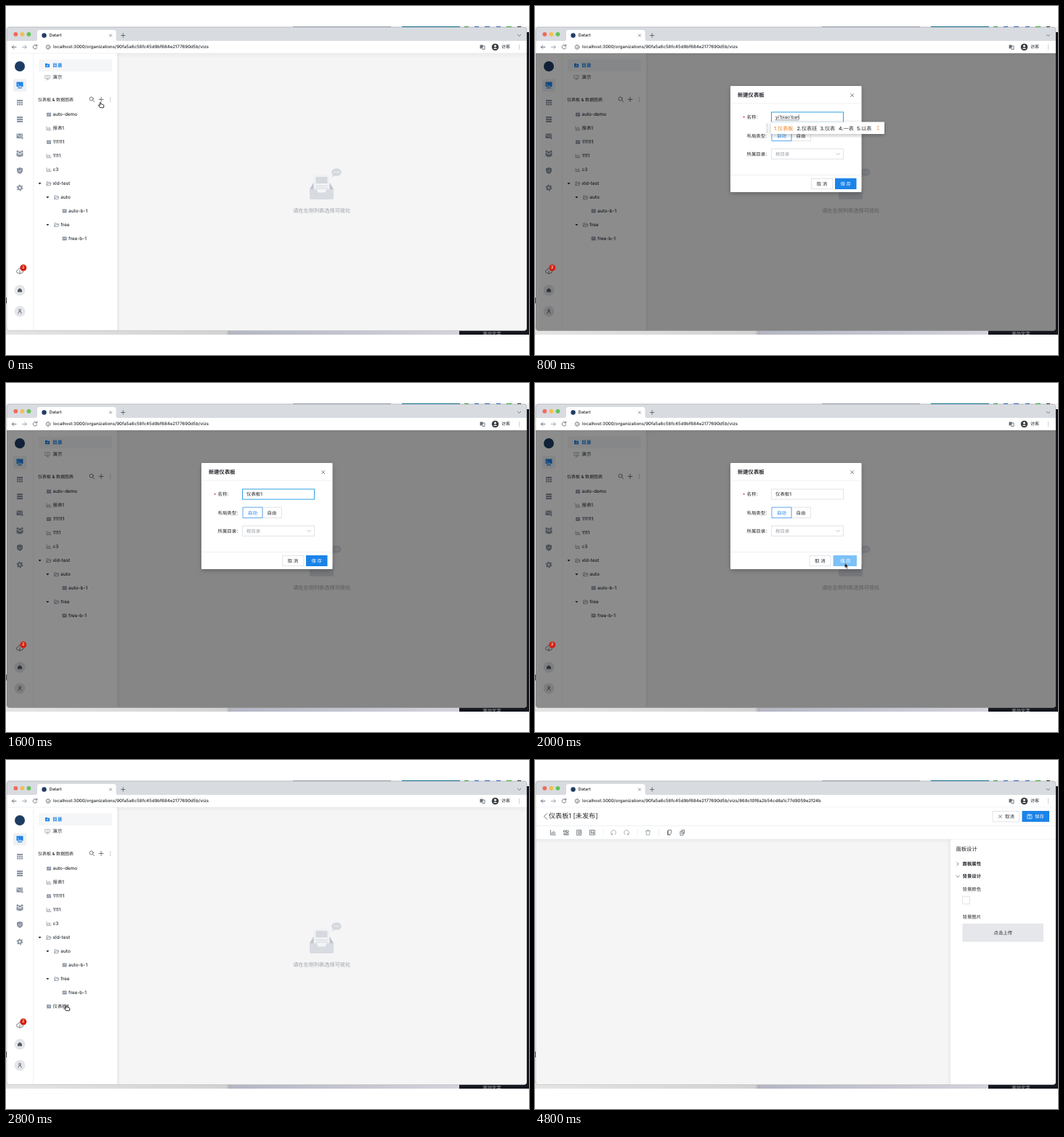
Write an HTML page that moves like this. It is 720x480 px and loops after 5.2 s.

```html
<!DOCTYPE html>
<html lang="zh">
<head>
<meta charset="utf-8">
<title>新建仪表板</title>
<style>
html, body { margin: 0; width: 100%; height: 100%; overflow: hidden; background: #fff; }
svg { display: block; }
#stage { width: 100vw; height: 100vh; }
text {
  font: 500 6.4px Inter, "Noto Sans CJK SC", "Noto Sans CJK", sans-serif;
  fill: #25282d; dominant-baseline: central; text-rendering: geometricPrecision;
}
.mid { text-anchor: middle; }
.bold { font-weight: 600; }
.plain { font-weight: 400; }
.url { font-size: 6.05px; }
.head { font-size: 9.1px; font-weight: 400; }
.title { font-size: 7.3px; }
.blue { fill: #1b83e8; }
.soft { fill: #9a9fa7; font-weight: 400; }
.white { fill: #fff; }
.line { fill: none; stroke: #555b64; stroke-width: .8; stroke-linecap: round; stroke-linejoin: round; }
.dim { stroke: #8b95a4; }
.rule { stroke: #e9ebee; stroke-width: .7; }
.btn { fill: #fff; stroke: #d5d8dd; stroke-width: .7; }
.on { stroke: #1b83e8; }
.grey { fill: #8b95a4; }

/* 13 beats of 400 ms, every change is a hard cut */
.t { animation: 5.2s step-end infinite; }
.workspace { animation-name: workspace; }
.empty { animation-name: empty; }
.opened { animation-name: opened; }
.created { animation-name: created; }
.dash { animation-name: dash; }
.editor { animation-name: editor; }
.modal { animation-name: modal; }
.pinyin { animation-name: pinyin; }
.word { animation-name: word; }
.numbered { animation-name: numbered; }
.focus { animation-name: focus; }
.ready { animation-name: ready; }
.saving { animation-name: saving; }
.hand { animation-name: hand; }
.arrow { animation-name: arrow; }
@keyframes workspace { 0% { opacity: 1 } 76.923% { opacity: 0 } }
@keyframes empty { 0% { opacity: 1 } 61.5384% { opacity: 0 } }
@keyframes opened { 0% { opacity: 0 } 61.5384%, 100% { opacity: 1 } }
@keyframes created { 0% { opacity: 0 } 46.1538%, 100% { opacity: 1 } }
@keyframes dash { 0%, 76.923% { opacity: 0 } 61.5384% { opacity: 1 } }
@keyframes editor { 0% { opacity: 0 } 76.923%, 100% { opacity: 1 } }
@keyframes modal { 0%, 46.1538% { opacity: 0 } 15.3846% { opacity: 1 } }
@keyframes pinyin { 0%, 23.0769% { opacity: 0 } 15.3846% { opacity: 1 } }
@keyframes word { 0%, 30.7692% { opacity: 0 } 23.0769% { opacity: 1 } }
@keyframes numbered { 0% { opacity: 0 } 30.7692%, 100% { opacity: 1 } }
@keyframes focus { 0%, 38.4615% { opacity: 0 } 15.3846% { opacity: 1 } }
@keyframes ready { 0% { opacity: 1 } 38.4615% { opacity: 0 } }
@keyframes saving { 0% { opacity: 0 } 38.4615%, 100% { opacity: 1 } }
@keyframes hand {
  0% { opacity: 1; transform: translate(131px, 136px) }
  15.3846% { opacity: 0; transform: none }
  53.8461% { opacity: 1; transform: translate(84px, 341px) }
  61.5384% { opacity: 0; transform: none }
  69.2307% { opacity: 1; transform: translate(669px, 109px) }
  76.923% { opacity: 0 }
}
@keyframes arrow {
  0%, 53.8461%, 69.2307% { opacity: 0; transform: none }
  38.4615% { opacity: 1; transform: translate(426.5px, 247.5px) }
  46.1538% { opacity: 1; transform: translate(369px, 264px) }
  61.5384% { opacity: 1; transform: translate(420px, 210px) }
}
</style>
</head>
<body>
<svg id="stage" viewBox="0 0 720 480" preserveAspectRatio="none">
<defs>
  <linearGradient id="desk"><stop stop-color="#e4e4e4"/><stop offset=".98" stop-color="#d2d2d4"/><stop offset="1" stop-color="#a9a9b0"/></linearGradient>
  <linearGradient id="desk2"><stop stop-color="#b4b6c4"/><stop offset="1" stop-color="#d3d3dc"/></linearGradient>
  <linearGradient id="fade" x2="0" y2="1"><stop stop-opacity=".04"/><stop offset="1" stop-opacity="0"/></linearGradient>
  <linearGradient id="edge"><stop stop-opacity=".045"/><stop offset="1" stop-opacity="0"/></linearGradient>
  <filter id="shadow" x="-20%" y="-20%" width="140%" height="150%"><feDropShadow dx="0" dy="2" stdDeviation="3" flood-opacity=".25"/></filter>
  <clipPath id="window"><path d="M1 33q0-4 4-4H713q4 0 4 4V442q0 4.500-4 4.500H5q-4 0-4-4.500z"/></clipPath>
  <clipPath id="desktop"><path d="M0 28H720V452H0z"/></clipPath>
  <symbol id="board" overflow="visible"><path d="M-3-2.500h6v5h-6z" fill="#8b95a4"/><path d="M-2 .8l1.300-1.500L.4.300 2-1.200" fill="none" stroke="#fff" stroke-width=".7"/></symbol>
  <symbol id="chart" overflow="visible"><path class="line dim" d="M-3-2.500v5H3M-1.200 1v-1.500M.4 1v-2.400M2 1V-.3" stroke-width=".6"/></symbol>
  <symbol id="folder" overflow="visible"><path class="line dim" d="M-3 2.200V-2.200H-.8l.7.900H2.300V0M-3 2.200L-1.900 0H3.200L2.200 2.200z" stroke-width=".7"/></symbol>
  <symbol id="close" overflow="visible"><path class="line" d="M-2-2L2 2M2-2L-2 2"/></symbol>
  <symbol id="dots" overflow="visible"><path d="M0-2.500h.01M0 0h.01M0 2.500h.01" stroke="#777e88" stroke-width="1.200" stroke-linecap="round"/></symbol>
</defs>

<g clip-path="url(#desktop)">
  <path d="M0 28H720V452H0z" fill="#f3f3f4"/>
  <path d="M395 28.500H530" stroke="#a5afb9"/>
  <path d="M545 28.500H625" stroke="#16789a"/>
  <g stroke-width="2"><path d="M631 28.500h6" stroke="#3aa655"/><path d="M645 28.500h6M659 28.500h7M675 28.500h6" stroke="#3569c9"/><path d="M689 28.500h7" stroke="#2eb82e"/><path d="M704 28.500h5" stroke="#333"/></g>
  <path d="M0 440H309V452H0z" fill="url(#desk)"/>
  <path d="M309 440H624V452H309z" fill="url(#desk2)"/>
  <path d="M624 440H720V452H624zM716 36H720V452H716z" fill="#15171e"/>
  <path d="M0 401H2V409H0z" fill="#555"/>
  <text class="plain" x="656" y="451" style="fill:#b9bbc0">滚动文字</text>
</g>

<g clip-path="url(#window)">
  <path d="M0 28H718V448H0z" fill="#fff"/>
  <path d="M0 28H718V48H0z" fill="#d8dbe0"/>
  <path d="M40 48q3 0 3-3V36q0-3 3-3H148.500q3 0 3 3V45q0 3 3 3z" fill="#fff"/>
  <circle cx="13.300" cy="38.800" r="2.900" fill="#ed6a5e"/><circle cx="22.400" cy="38.800" r="2.900" fill="#f4be4f"/><circle cx="31.400" cy="38.800" r="2.900" fill="#61c454"/>
  <circle cx="52.500" cy="40.500" r="3.200" fill="#1f3d63"/>
  <text x="59.500" y="40.500" style="font-size:5.800px">Datart</text>
  <use href="#close" transform="translate(144 40.500) scale(.8)"/>
  <path class="line" d="M158.500 40.500h5.400M161.200 37.800v5.400M704.500 39.500l2 2 2-2"/>
  <path class="line" d="M14 56.500H8.300M10.800 54L8.300 56.500 10.800 59"/>
  <path class="line dim" d="M22.500 56.500h5.700M25.700 54l2.500 2.500-2.500 2.500"/>
  <path class="line" d="M42.300 54.700a2.800 2.800 0 1 0 .4 2.500M42.700 53v2h-2"/>
  <circle class="line" cx="58" cy="56.500" r="2.800"/><path class="line" d="M58 56.300v1.600M58 54.900v.1"/>
  <text class="url" x="65" y="56.500">localhost:3000/organizations/90fa5a6c58fc45d9bf684e2177690d5b/vizs<tspan class="t opened" id="suffix"></tspan></text>
  <g class="t opened"><path d="M64 52H410V61H64z" fill="#fff"/><text class="url" x="65" y="56.500">localhost:3000/organizations/90fa5a6c58fc45d9bf684e2177690d5b/vizs/868c10f6a2b54cd8a1c77d9059e2f24b</text></g>
  <path d="M652.500 53.500h4v5h-4z" fill="#777e88"/><path class="line" d="M656 55h3v4.500h-3M653.500 55h2M654.500 55l-1 2"/>
  <circle cx="673.500" cy="56.500" r="4.800" fill="#3c4043"/><circle cx="673.500" cy="55" r="1.500" fill="#fff"/><path d="M670.700 59q2.800-3 5.600 0z" fill="#fff"/>
  <text x="682" y="56.500" style="font-size:6px">访客</text>
  <use href="#dots" x="706.500" y="56.500"/>
  <path class="rule" d="M0 65H718"/>

  <g class="t workspace">
    <circle cx="19" cy="83" r="7" fill="#1f3d63"/>
    <rect x="10" y="100.500" width="18" height="17" rx="1.500" fill="#eef0f4"/>
    <path d="M14.500 104.500h9v6.500h-9zM16 112h6v1.200h-6z" fill="#1b83e8"/><path d="M16 107l1.500 1.500L16 110M18.500 110h2.500" fill="none" stroke="#fff" stroke-width=".7"/>
    <g class="grey">
      <path d="M15 129h8v2h-8zM15 131.800h2.300v2h-2.300zM17.900 131.800h2.300v2h-2.300zM20.800 131.800h2.200v2h-2.200zM15 134.500h2.300v2h-2.300zM17.900 134.500h2.300v2h-2.300zM20.800 134.500h2.200v2h-2.200z"/>
      <path d="M15 152h8v2.200h-8zM15 154.900h8v2.200h-8zM15 157.800h8v2.200h-8z"/>
      <path d="M14.500 175.500h8.500v6.500h-8.500z"/><path d="M15 176.500l3.800 3 3.700-3" fill="none" stroke="#fff" stroke-width=".8"/><circle cx="22.200" cy="181.500" r="1.700" stroke="#fff" stroke-width=".6"/>
      <circle cx="16" cy="200" r="1.600"/><circle cx="22" cy="200" r="1.600"/><circle cx="19" cy="201.500" r="1.700"/><path d="M14.500 202h2.200v4.500h-2.200zM21.300 202h2.200v4.500h-2.200zM16.500 204h5v3.500h-5z"/>
      <path d="M19 222l4 1.300V227q-.5 2.800-4 4-3.500-1.200-4-4v-3.700z"/><path d="M17.300 226.300l1.300 1.400 2.300-2.500" fill="none" stroke="#fff" stroke-width=".8"/>
      <circle cx="19" cy="250" r="3.200"/><circle cx="19" cy="250" r="3.700" fill="none" stroke="#8b95a4" stroke-width="1.400" stroke-dasharray="1.900 1.980"/><circle cx="19" cy="250" r="1.400" fill="#fff"/>
    </g>
    <path class="line" d="M17 367.500q-2.500 0-2.500-2.300 0-1.900 2-2.300.8-2.400 3.300-1.900 1.700.4 2 2 1.700.4 1.700 2.200 0 2.300-2.500 2.300M19 364v4.500l-1.300-1.300M19 368.500l1.300-1.300"/>
    <circle cx="19" cy="391" r="7.500" fill="#e4e6ea"/><path d="M16 390.500l3-2.500 3 2.500v3h-6z" fill="#555b64"/>
    <circle cx="19" cy="420" r="7.500" fill="#e4e6ea"/><circle class="line" cx="19" cy="418.500" r="1.400"/><path class="line" d="M16.800 423q0-2.700 2.200-2.700t2.200 2.700"/>

    <path class="rule" d="M37.700 65V447"/>
    <path d="M45 73.500H146V90H45z" fill="#f5f6f8"/>
    <path d="M54 79h2.500l.8.800H60V84.200H54z" fill="#1b83e8"/><path d="M55.500 82h3M57 80.700v2.500" stroke="#fff" stroke-width=".6"/>
    <text class="blue bold" x="64" y="81.500" style="font-size:6.700px">目录</text>
    <path class="line dim" d="M54 95.500h6.500v4H54zM57.200 99.500v1.700M55.500 101.200h3.500M55.800 97.300h3" style="stroke-width:.6"/>
    <text x="64" y="98" style="font-size:6.700px">演示</text>
    <text x="44" y="129" style="font-size:6px">仪表板 &amp; 数据图表</text>
    <circle class="line" cx="117.600" cy="127.700" r="2.500"/><path class="line" d="M119.500 129.600l2.200 2.200M128 128.500h6M131 125.500v6"/>
    <use href="#dots" x="143.700" y="128.500"/>
    <g id="tree"></g>
    <g class="t created"><use href="#board" x="59" y="339"/><text x="64.500" y="339">仪表板1</text></g>
    <g class="t opened"><path d="M38 330H153V349H38z" fill="#f5f6f8"/><path d="M56 336.500h6v5h-6z" fill="#1b83e8"/><path d="M57 340l1.300-1.500 1.100 1 1.600-1.500" fill="none" stroke="#fff" stroke-width=".7"/><text class="blue" x="64.500" y="339">仪表板1</text></g>

    <path d="M153 65H717V447H153z" fill="#f5f5f5"/>
    <g class="t empty">
      <path d="M153 65H717V71H153z" fill="url(#fade)"/>
      <ellipse cx="455" cy="228.500" rx="6.800" ry="5.300" fill="#d5d9df"/><path d="M450 231.500l-1.200 4.200 4-2.500z" fill="#d5d9df"/>
      <path d="M452 228.500h.01M455 228.500h.01M458 228.500h.01" stroke="#fff" stroke-width="1.500" stroke-linecap="round"/>
      <path d="M418 252l5-8.500h23l5 8.500z" fill="#c0c5cd"/>
      <path d="M423.500 232.500h22v20h-22z" fill="#f0f1f4"/>
      <path d="M426.500 235h16v9h-16zM426.500 247h16v1h-16zM426.500 250h16v1h-16z" fill="#d5d9df"/>
      <path d="M418 252h9.500q1 0 1 2 0 2.500 2 2.500h8q2 0 2-2.500 0-2 1-2H451v12q0 2-2 2H420q-2 0-2-2z" fill="#d8dbe1"/>
      <text class="soft mid" x="434.700" y="281" style="font-size:7.200px">请在左侧列表选择可视化</text>
    </g>
    <g class="t dash">
      <path d="M158.500 70H204V87H158.500z" fill="#eceef1"/>
      <text class="blue bold" x="165.500" y="78.500">仪表板1</text>
      <path d="M153 92H717V119H153z" fill="#fff"/><path d="M153 119H717V125H153z" fill="url(#fade)"/>
      <path class="rule" d="M153 92H717"/>
      <text class="head" x="162" y="105.500">仪表板1 [未发布]</text>
      <path class="btn" d="M612 98.500h36.500v14.500H612zM693.500 98.500H708v14.500h-14.500z"/><path class="btn on" d="M652.500 98.500H690v14.500h-37.500z"/>
      <path class="line" d="M619.500 103l5.300 2.700-5.300 2.700 1.200-2.700zM620.700 105.700h2"/><text x="629" y="106">发布</text>
      <path class="line on" d="M661 106.500l3-3.300 1.300 1.200-3 3.200-1.600.4zM660.500 109h5.500"/><text class="blue" x="669.500" y="106">编辑</text>
      <use href="#dots" transform="translate(700.700 105.700) scale(.8)"/>
    </g>
    <path d="M153 65h5V447h-5z" fill="url(#edge)"/>
  </g>

  <g class="t modal">
    <path d="M0 65H718V448H0z" opacity=".45"/>
    <rect x="269" y="110" width="180.500" height="146" rx="1" fill="#fff" filter="url(#shadow)"/>
    <text class="title bold" x="279" y="122.500">新建仪表板</text><use href="#close" x="436.700" y="122.700"/>
    <path class="rule" d="M269 134H449.500M269 232.500H449.500"/>
    <text x="286" y="154" style="fill:#f5222d">*</text>
    <text class="plain" x="291.500" y="153">名称：</text>
    <text class="plain" x="291.500" y="178.500">布局类型：</text>
    <text class="plain" x="291.500" y="203.500">所属目录：</text>
    <path class="btn" d="M325.500 146h99v14h-99zM353 171h26.500v14.500H353zM325.500 196.500h99v14h-99z"/>
    <path class="btn on" d="M326 171h27v14.500h-27z"/>
    <text class="blue mid" x="339.500" y="178.500">自动</text><text class="mid" x="366" y="178.500">自由</text>
    <text class="soft" x="331" y="203.700">根目录</text><path class="line dim" d="M415 202.500l2.200 2.200 2.200-2.200" style="stroke-width:.6"/>
    <path class="btn on t focus" d="M325.500 146h99v14h-99z" style="stroke:#38a5e8;stroke-width:1.100"/>
    <text class="t word" x="331" y="153">仪表板</text>
    <path class="line t word" d="M350.700 149.500v7"/>
    <text class="t numbered" x="331" y="153">仪表板1</text>
    <g class="t ready">
      <path class="btn" d="M380.500 237.500H410V251.500H380.500z"/><path d="M413 237h29.500v15H413z" fill="#1b83e8"/>
      <text class="mid" x="395" y="244.500">取 消</text><text class="mid white" x="427.700" y="244.500">保 存</text>
    </g>
    <g class="t saving">
      <path class="btn" d="M378 237.500H407V251.500H378z"/><path d="M410.500 237H443v15H410.500z" fill="#7cc1f7"/>
      <text class="mid" x="392.500" y="244.500">取 消</text><text class="mid white" x="427.500" y="244.500">保 存</text>
    </g>
    <g class="t pinyin">
      <text class="plain" x="331" y="153">yi'biao'ban</text><path class="line" d="M331 156.800h31.500M363.200 149.500v7" style="stroke-width:.6"/>
      <path d="M325 159.500H481V176H325z" fill="#fff" filter="url(#shadow)"/>
      <path d="M319.500 162v13" stroke="#c5c8cd" stroke-width="2.500" stroke-dasharray="1.200 1.500"/>
      <g id="candidates"></g>
      <path d="M470.500 166.500l1.800-2 1.800 2zM470.500 169l1.800 2 1.800-2z" fill="#f2a46b"/>
    </g>
  </g>

  <g class="t workspace">
    <circle cx="23.800" cy="360" r="4.500" fill="#d3200f"/><text class="mid white" x="23.800" y="360" style="font-size:5.500px">2</text>
  </g>

  <g class="t editor">
    <path d="M0 65.500H718V448H0z" fill="#fff"/>
    <path d="M0 109H572V448H0z" fill="#f5f5f5"/><path d="M0 109H572V115H0z" fill="url(#fade)"/>
    <path d="M567 109h5V448h-5z" fill="url(#edge)" transform="rotate(180 569.500 278.500)"/>
    <path class="rule" d="M0 90.500H718M0 109H718M94 95v10M141 95v10M170.500 95v10"/>
    <path class="line" d="M16.500 73.700l-4 3.800 4 3.800"/><text class="head" x="19" y="77.500">仪表板1 [未发布]</text>
    <path class="btn" d="M630 70.500h36.500V85H630z"/><path d="M670.500 70H708v15h-37.500z" fill="#1b83e8"/>
    <use href="#close" x="640.500" y="77.700"/><text x="647" y="77.700">取消</text>
    <path class="line" d="M678.300 75h4.500l1.200 1.200v4.500h-5.700zM679.700 75v1.700h2.500V75" style="stroke:#fff;stroke-width:.7"/><circle cx="681.100" cy="78.700" r=".8" fill="#fff"/>
    <text class="white" x="688" y="77.700">保存</text>
    <g class="line" style="stroke-width:.75">
      <path d="M21.500 96.500v6.500H28.500M23.500 101.500v-2M25.300 101.500v-3.500M27.200 101.500v-2.500"/>
      <path d="M39.700 97h2.600v2h-2.600zM43.500 97h2.500v2.500h-2.500zM40.300 101h2v2h-2zM43.500 101h2.500v2h-2.500z"/>
      <path d="M58 96.300h5.500v7H58zM59.500 101.500h2.500"/><circle cx="60.700" cy="99" r="1.300"/>
      <path d="M75.700 96.500h6.600v6.500h-6.600zM77.700 98v3.500M80.300 98v3.500M77 99h1.500M79.500 100.500h1.500"/>
      <path class="dim" d="M106.200 102.600a3.300 3.300 0 1 1 3.700 0M104.700 102.300l1.700.4-.2-1.700M124.200 102.600a3.300 3.300 0 1 1 3.700 0M129.300 102.300l-1.700.4.2-1.700"/>
      <path class="dim" d="M152.500 97.700h6M154.300 97.500v-1h2.400v1M153.200 98v5h4.600v-5"/>
      <path d="M182.500 97.500v5.500h3.500M183.700 96.300h4v4l-1.500 2h-2.500zM200.300 98.300h3.700v5h-3.700zM202 98v-1.700h3.500v4.700H204M201.500 100.500h1.500"/>
      <path d="M581 140.800l2.200 2.200-2.200 2.200M580 159l2.200 2.200 2.200-2.200"/>
    </g>
    <text class="title" x="579.500" y="122">面板设计</text>
    <text class="bold" x="588.500" y="143">面板属性</text><text class="bold" x="588.500" y="160">背景设计</text>
    <text class="plain" x="588.500" y="177.500">背景颜色</text>
    <path class="btn" d="M588.500 187.500h10v10.500h-10z"/>
    <text class="plain" x="588.500" y="216">背景图片</text>
    <path d="M588.500 225H700V250H588.500z" fill="#e5e7eb"/><text class="plain mid" x="644.300" y="237.500">点击上传</text>
  </g>
</g>
<path d="M1 33q0-4 4-4H713q4 0 4 4V442q0 4.500-4 4.500H5q-4 0-4-4.500z" fill="none" stroke="#000" stroke-opacity=".25" stroke-width=".6"/>

<g class="t hand"><path d="M-1.800 3.500L-3.800.5q.3-1.200 1.500-.2l.6.600V-3q.8-1.200 1.600 0v2.200q1-.7 1.400.2 1-.5 1.400.4 1-.2 1 .8V2q0 1.200-.7 2z" fill="#fff" stroke="#000" stroke-width=".8" stroke-linejoin="round"/></g>
<g class="t arrow"><path d="M0 0v7l1.600-1.500 1.200 2.700 1.300-.6L2.900 5H5z" fill="#000" stroke="#fff" stroke-width=".5"/></g>
</svg>
<script>
const el = id => document.getElementById(id);
const rows = [
  ['board', 0, 'auto-demo'], ['chart', 0, '报表1'], ['board', 0, '111111'], ['chart', 0, '1111'], ['chart', 0, 'c3'],
  ['folder', 0, 'xld-test', 1], ['folder', 1, 'auto', 1], ['board', 2, 'auto-b-1'], ['folder', 1, 'free', 1], ['board', 2, 'free-b-1']
];
el('tree').innerHTML = rows.map(([icon, depth, label, open], i) => {
  const x = 59 + depth * 10.8, y = 149.3 + i * 18.95;
  const caret = open ? `<path d="M${x - 14.500} ${y - 1}h4l-2 2.400z" fill="#25282d"/>` : '';
  return `${caret}<use href="#${icon}" x="${x}" y="${y}"/><text x="${x + 5.5}" y="${y}">${label}</text>`;
}).join('');
const words = [['仪表板', 329], ['仪表班', 360.5], ['仪表', 392.5], ['一表', 418], ['以表', 443]];
el('candidates').innerHTML = words.map(([word, x], i) =>
  `<text x="${x}" y="168" style="font-size:7.1px;fill:${i ? '#333' : '#e8821e'}">${i + 1}.${word}</text>`).join('');
el('suffix').remove();
</script>
</body>
</html>
```
